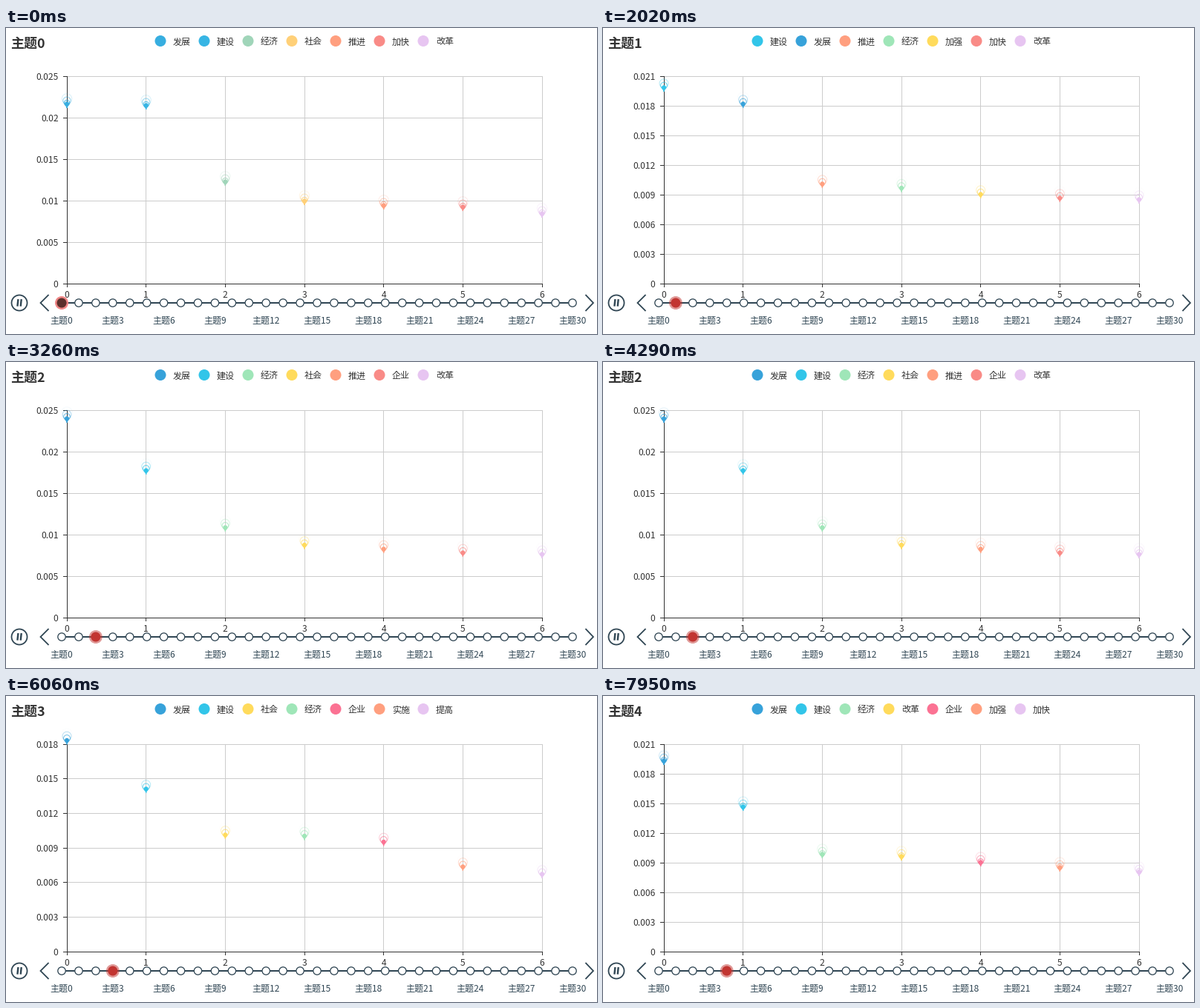
A matplotlib script that plays this animation: 796 by 413 pixels, repeating every 8 s.

```python
import math

import matplotlib.pyplot as plt
import numpy as np
from matplotlib.animation import FuncAnimation
from matplotlib.path import Path
from matplotlib.patches import Circle, PathPatch
from matplotlib.transforms import Affine2D

W, H, DPI = 796, 413, 64
PT = 72 / DPI                       # points per pixel
LOOP, STEP = 8000, 40
MOVE = 300                          # length of a theme change, ms
RIPPLE = 4000 / 3                   # time between two ripples, ms
LEFT, RIGHT, TOP, BASE = 82, 722, 65, 345
TRACK_X, TRACK_GAP, TRACK_Y = 75, 688 / 30, 371
INK, SLATE, GRID = "#333333", "#304654", "#cccccc"
FONT = "Noto Sans CJK JP"

BLUE, CYAN, GREEN, YELLOW = "#37a2da", "#32c5e9", "#9fe6b8", "#ffdb5c"
ORANGE, CORAL, PINK, LILAC = "#ff9f7f", "#f98b87", "#fb7293", "#e7c5f1"

# start, axis top and tick step (thousandths), words, colours,
# pin tips (px), slot each pin comes from
THEMES = [
    (0, 25, 5, "发展 建设 经济 社会 推进 加快 改革",
     ["#37aee0", "#37b5e4", "#a0d5b9", "#ffd078", ORANGE, CORAL, LILAC],
     [108, 110, 213, 239, 245, 247, 256], range(7)),
    (704, 21, 3, "建设 发展 推进 经济 加强 加快 改革",
     [CYAN, BLUE, ORANGE, GREEN, YELLOW, CORAL, LILAC],
     [86, 108, 216, 221.5, 230, 235, 237], [1, 0, 4, 2, 3, 5, 6]),
    (2750, 25, 5, "发展 建设 经济 社会 推进 企业 改革",
     [BLUE, CYAN, GREEN, YELLOW, ORANGE, CORAL, LILAC],
     [82, 152, 229, 252.5, 258, 263, 265], [1, 0, 3, 4, 2, 5, 6]),
    (4795, 18, 3, "发展 建设 社会 经济 企业 实施 提高",
     [BLUE, CYAN, YELLOW, GREEN, PINK, ORANGE, LILAC],
     [65.5, 131, 193, 194.5, 202.5, 236, 246], [0, 1, 3, 2, 5, 4, 6]),
    (6785, 21, 3, "发展 建设 经济 改革 企业 加强 加快",
     [BLUE, CYAN, GREEN, YELLOW, PINK, ORANGE, LILAC],
     [93, 155, 219, 222, 230, 237, 243], [0, 1, 3, 2, 4, 5, 6]),
]


def cubic_out(k):
    return 1 - (1 - k) ** 3


def quintic_in_out(k):
    return 16 * k ** 5 if k < 0.5 else 1 - 16 * (1 - k) ** 5


def mix(a, b, k):
    return a + (b - a) * k


def crisp(v):
    """Centre of the pixel that holds v."""
    return math.floor(v) + 0.5


def slot_x(i):
    return LEFT + (RIGHT - LEFT) / 6 * i


def level_y(value, top):
    return mix(BASE, TOP, value / top)


def pin_path(size=10):
    """Map pin whose tip is the origin, y pointing down."""
    r = size * 0.3
    dy = r * r / (size - r)
    cy = -size + r + dy
    a = math.asin(dy / r)
    dx, y = math.cos(a) * r, cy + dy
    arc = Path.arc(180 - math.degrees(a), 360 + math.degrees(a))
    side = dx - math.sin(a) * r * 0.6
    bend = y + math.cos(a) * r * 0.6
    tail = [(side, bend), (0, -r * 0.7), (0, 0),
            (0, -r * 0.7), (-side, bend), (-dx, y)]
    verts = np.vstack([arc.vertices * r + (0, cy), tail])
    codes = list(arc.codes) + [Path.CURVE4] * 6
    return Path(verts, codes)


fig = plt.figure(figsize=(W / DPI, H / DPI), dpi=DPI, facecolor="white")
ax = fig.add_axes([0, 0, 1, 1])
ax.set_xlim(0, W)
ax.set_ylim(H, 0)
ax.axis("off")


def line(xs, ys, color, width=1, z=1):
    return ax.plot(xs, ys, color=color, lw=width * PT, zorder=z, snap=False,
                   solid_capstyle="butt", solid_joinstyle="miter")[0]


def label(x, y, text="", size=12, color=INK, ha="center", **kw):
    return ax.text(x, y + size * 0.37, text, fontsize=size * PT, color=color,
                   family=FONT, ha=ha, va="baseline", zorder=3, **kw)


def disc(x, y, r, z, **kw):
    return ax.add_patch(Circle((x, y), r, zorder=z, snap=False, **kw))


# Chart frame
floor_y = crisp(BASE)
for i in range(7):
    x = crisp(slot_x(i))
    line([x, x], [TOP, BASE], GRID)
    line([x, x], [BASE, BASE + 5], INK, z=2)
    label(slot_x(i), 360, str(i))
line([crisp(LEFT)] * 2, [TOP, BASE + 1], INK, z=2)
line([LEFT, RIGHT + 1], [floor_y, floor_y], INK, z=2)

grid = [line([LEFT, RIGHT], [0, 0], GRID) for _ in range(9)]
ticks = [line([LEFT - 5, LEFT], [0, 0], INK, z=2) for _ in range(9)]
levels = [label(70.5, 0, ha="right") for _ in range(9)]

# Title and legend
title = label(6.5, 19.5, size=18, ha="left", weight="bold")
badges = [disc(208 + 59 * i, 17.5, 7.5, 2, lw=0) for i in range(7)]
words = [label(225 + 59 * i, 18, ha="left") for i in range(7)]

# Timeline
line([TRACK_X, TRACK_X + 30 * TRACK_GAP], [TRACK_Y, TRACK_Y], SLATE, 2, 4)
for i in range(31):
    x = TRACK_X + TRACK_GAP * i
    disc(x, TRACK_Y, 5.2, 5, fc="white", ec=SLATE, lw=1.3 * PT)
    if i % 3 == 0:
        label(x, 394.5, f"主题{i}", color=SLATE)
halo = disc(0, TRACK_Y, 9, 6, lw=0)
knob = disc(0, TRACK_Y, 6.5, 7, lw=0)

# Controls
disc(18, TRACK_Y, 10.5, 4, fc="none", ec=SLATE, lw=1.8 * PT)
for x in (16, 20.3):
    line([x + 0.4, x - 0.6], [TRACK_Y - 5, TRACK_Y + 4.6], SLATE, 2.4, 4)
for tip, open_x in ((46.5, 57.5), (791, 780.5)):
    line([open_x, tip, open_x], [TRACK_Y - 11, TRACK_Y, TRACK_Y + 11],
         SLATE, 1.8, 4)

# Pins with three ripples each
PIN = pin_path()
pins = [ax.add_patch(PathPatch(PIN, lw=0, zorder=9)) for _ in range(7)]
waves = [[ax.add_patch(PathPatch(PIN, fc="none", lw=PT, zorder=8))
          for _ in range(3)] for _ in range(7)]


def place(patch, x, y, scale=1.0):
    patch.set_transform(Affine2D().scale(scale).translate(x, y) + ax.transData)


def draw_levels(now, old, k):
    top, step = now[1:3]
    known = range(0, old[1] + 1, old[2])
    values = range(0, top + 1, step)
    for i, (g, t, text) in enumerate(zip(grid, ticks, levels)):
        shown = i < len(values)
        for part in (g, t, text):
            part.set_visible(shown)
        if not shown:
            continue
        v = values[i]
        y = level_y(v, top)
        if v in known:
            y = mix(level_y(v, old[1]), y, k)
        for part in (g, t):
            part.set_ydata([crisp(y)] * 2)
        text.set_y(y + 4.5)
        text.set_text(f"{v / 1000:g}")


def draw(frame):
    t = frame * STEP
    n = sum(t >= theme[0] for theme in THEMES) - 1
    now, old = THEMES[n], THEMES[max(n - 1, 0)]
    k = min((t - now[0]) / MOVE, 1) if n else 1
    ease = cubic_out(k)
    phase = (0.43 + t / RIPPLE) % 1

    title.set_text(f"主题{n}")
    draw_levels(now, old, ease)

    _, _, _, names, colors, tips, origin = now
    for i, name in enumerate(names.split()):
        words[i].set_text(name)
        badges[i].set_facecolor(colors[i])
        x = mix(slot_x(origin[i]), slot_x(i), ease)
        y = mix(old[5][origin[i]], tips[i], ease)
        pins[i].set_facecolor(colors[i])
        place(pins[i], x, y)
        for j, wave in enumerate(waves[i]):
            life = (j + phase) / 3
            wave.set_edgecolor(colors[i])
            wave.set_alpha(1 - life)
            place(wave, x, y, 1 + 1.5 * life)

    x = TRACK_X + TRACK_GAP * mix(max(n - 1, 0), n, quintic_in_out(k))
    for part in (halo, knob):
        part.center = (x, TRACK_Y)
    knob.set_facecolor("#c23531" if n else "#5c302c")
    halo.set_facecolor("#c23531" if n else "#f08080")
    halo.set_alpha(0.5 if n else 0.95)
    return []


anim = FuncAnimation(fig, draw, frames=LOOP // STEP, interval=STEP,
                     init_func=lambda: draw(0), repeat=True, repeat_delay=0,
                     blit=False)
plt.show()
```
